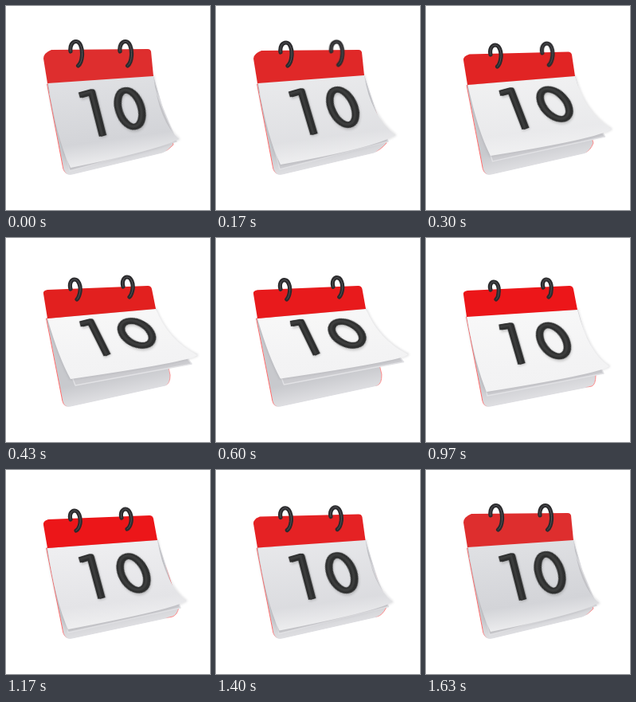
Write an HTML page without scripts that moves like this. It is 256 px wide and 256 px high and loops after 1710 ms.

```html
<!DOCTYPE html>
<html lang="en">
<head>
<meta charset="utf-8">
<title>Calendar</title>
<style>
html, body { margin: 0; width: 100%; height: 100%; overflow: hidden; background: #fff; }
svg { display: block; width: 100vw; height: 100vh; }
svg * { animation: 1710ms linear infinite; }
path, ellipse { stroke-linecap: round; stroke-linejoin: round; }

.stack { animation-name: stack; }
.sheet { animation-name: sheet; }
.page { animation-name: page; }
.head { animation-name: head; }
.one { animation-name: one; stroke-linecap: butt; }
.zero { animation-name: zero; }
.ring { animation-name: ring; }
.second { animation-name: second; }
.lit { animation-name: lit; }
.low { animation-name: low; }
.red { animation-name: red; }

.digits { fill: none; }
.shade { stroke: #555; stroke-width: 9; opacity: .3; }
.body { stroke: #2e2f2f; stroke-width: 7.2; }
.shine { stroke: #3c3d3d; stroke-width: 3; }
.tube { fill: none; stroke: #2b2b2d; stroke-width: 5.2; }
.gleam { fill: none; stroke: #55555a; stroke-width: 1; }

@keyframes stack {
  0%, 95.32%, to { d: path("M52 98L185 89L210 174Q203 182 196 184L83 211Q75 213 72 205Z"); }
  9.94% { d: path("M52 98L186 88L214 172Q206 181 198 184L83 211Q75 213 72 205Z"); }
  25.15%, 32.75% { d: path("M51 101L188 89L206 172Q206 183 200 185L81 211Q73 213 71 205Z"); }
  42.69% { d: path("M51 101L188 89L214 168Q215 183 210 185L81 211Q73 213 71 205Z"); }
  56.73% { d: path("M51 99L190 90L213 172Q213 184 208 186L81 211Q73 213 71 205Z"); }
  68.42% { d: path("M51 98L190 88L217 172Q215 182 209 184L83 211Q75 213 72 205Z"); }
}
@keyframes sheet {
  0%, 95.32%, to { d: path("M55 110L186 102L214 170L80 207Z"); }
  9.94% { d: path("M55 110L186 102L216 170L80 205Z"); }
  25.15% { d: path("M60 115L190 102L233 158L87 185Z"); }
  32.75% { d: path("M60 115L190 102L236 155L87 183Z"); }
  42.69% { d: path("M58 115L190 102L234 157L80 187Z"); }
  56.73% { d: path("M56 110L190 102L223 170L77 198Z"); }
  68.42% { d: path("M56 110L190 102L219 173L78 204Z"); }
}
@keyframes page {
  0%, 95.32%, to { d: path("M53 97L185 88Q192 145 217 167Q190 181 81 203Q63 165 53 97Z"); }
  9.94% { d: path("M53 97L186 87Q194 138 225 162Q200 178 81 199Q64 165 53 97Z"); }
  25.15% { d: path("M52 101L188 89Q203 128 240 147Q232 155 81 177Q66 150 52 101Z"); animation-timing-function: ease-out; }
  32.75% { d: path("M52 101L188 89Q204 127 242 145Q234 153 82 175Q67 150 52 101Z"); }
  42.69% { d: path("M52 101L188 89Q204 130 238 150Q228 158 77 181Q64 150 52 101Z"); }
  56.73% { d: path("M51 98L190 90Q204 145 230 161Q215 171 76 193Q62 160 51 98Z"); }
  68.42% { d: path("M52 98L190 88Q200 145 226 164Q215 174 78 200Q62 165 52 98Z"); }
}
@keyframes head {
  0%, 95.32%, to { d: path("M57 55L178 54Q181 54 182 57L185 88L52 97L47 66Q47 59 57 55Z"); }
  9.94% { d: path("M57 56L179 55Q182 55 183 58L186 87L52 97L47 66Q47 60 57 56Z"); }
  25.15%, 32.75% { d: path("M52 65L178 60Q182 60 183 64L188 89L52 101L47 70Q46 66 52 65Z"); }
  42.69% { d: path("M52 66L180 60Q184 60 185 64L188 89L52 101L47 71Q46 67 52 66Z"); }
  56.73% { d: path("M52 66L180 60Q184 60 185 64L190 90L51 99L47 71Q46 67 52 66Z"); }
  68.42% { d: path("M53 62L180 57Q184 57 185 61L190 88L52 98L47 69Q46 64 53 62Z"); }
}
@keyframes one {
  0%, 95.32%, to { d: path("M93 112L107.5 108L121.5 163"); }
  9.94% { d: path("M93 111L107 107L123 161"); }
  25.15% { d: path("M94 108L106 105L127 147"); }
  32.75% { d: path("M95 107L107 105L128 145"); }
  42.69% { d: path("M93 109L105 107L121 150"); }
  56.73% { d: path("M93 112L106 110L120 158"); }
  68.42% { d: path("M93 113L106 109L120 161"); }
}
@keyframes zero {
  0%, 95.32%, to { transform: translate(155.5px, 128.7px) rotate(71deg); rx: 23.8px; ry: 14px; }
  9.94% { transform: translate(159px, 127px) rotate(64deg); rx: 23.8px; ry: 13.8px; }
  25.15% { transform: translate(164px, 119.5px) rotate(29deg); rx: 21px; ry: 13.3px; }
  32.75% { transform: translate(165px, 119px) rotate(26deg); rx: 21px; ry: 12.8px; }
  42.69% { transform: translate(163px, 122.5px) rotate(35deg); rx: 20px; ry: 13px; }
  56.73% { transform: translate(160px, 129px) rotate(53deg); rx: 22px; ry: 14.2px; }
  68.42% { transform: translate(160px, 129.5px) rotate(61deg); rx: 23px; ry: 14.4px; }
}
@keyframes ring {
  0%, 95.32%, to { d: path("M81 57C80 50 83 44.5 88 44.5C93 44.5 96 53 95.5 62C95 69 93 73 90.5 75"); }
  9.94% { d: path("M81 58C80 51 83 46 88 46C93 46 95.5 54 95 62C94.5 69 92.5 73 90 75"); }
  25.15%, 32.75% { d: path("M81 64C79 57 82 52 86 52C91 52 94 60 93 67C92 73 90 76 89 77"); }
  42.69%, 56.73% { d: path("M81 65C79 59 82 55 85 55C90 55 92 62 91 69C91 74 89 76 88 77"); }
  68.42% { d: path("M81 62C79 56 82 51 86 51C91 51 94 59 93 67C92 72 90 75 88 76"); }
}
@keyframes second {
  0%, 95.32%, to { transform: translate(62px, 0); }
  25.15%, 56.73% { transform: translate(66px, -3px); }
  68.42% { transform: translate(64px, -2px); }
}
@keyframes lit {
  0%, 95.32%, to { stop-color: #e0e1e4; }
  25.15%, 56.73% { stop-color: #f8f8f8; }
  68.42% { stop-color: #efeff1; }
}
@keyframes low {
  0%, 95.32%, to { stop-color: #d3d4d8; }
  25.15%, 56.73% { stop-color: #f3f3f4; }
  68.42% { stop-color: #e4e4e7; }
}
@keyframes red {
  0%, 95.32%, to { fill: #de2e2e; }
  25.15% { fill: #e2201f; }
  42.69%, 68.42% { fill: #ec1619; }
}
</style>
</head>
<body>
<svg viewBox="0 0 256 256">
  <defs>
    <linearGradient id="paper" x1=".3" y1="0" x2=".5" y2="1">
      <stop class="lit" offset="0"/>
      <stop class="low" offset=".7"/>
      <stop offset="1" stop-color="#f2f2f3"/>
    </linearGradient>
    <linearGradient id="side" gradientUnits="userSpaceOnUse" x1="130" y1="175" x2="136" y2="204">
      <stop offset="0" stop-color="#c8c9cd"/>
      <stop offset="1" stop-color="#e2e2e5"/>
    </linearGradient>
    <linearGradient id="fringe" gradientUnits="userSpaceOnUse" x1="50" y1="0" x2="220" y2="0">
      <stop offset=".12" stop-color="#ff6a6a"/>
      <stop offset=".16" stop-color="#dcdce0"/>
      <stop offset=".88" stop-color="#dcdce0"/>
      <stop offset=".92" stop-color="#ff8a8a"/>
    </linearGradient>
    <filter id="soft"><feGaussianBlur stdDeviation="1.5"/></filter>
  </defs>

  <path class="stack" fill="url(#side)" stroke="url(#fringe)"/>
  <path class="sheet" fill="#ccccd0" stroke="#e2e2e5" stroke-width="1.4"/>
  <path class="page" fill="none" stroke="#8c8c92" stroke-width="2" opacity=".35" filter="url(#soft)"/>
  <path class="page" fill="url(#paper)"/>
  <g class="red"><path class="head"/></g>

  <!-- Two offset copies make the upright strokes heavier. -->
  <g class="digits">
    <g class="shade" transform="translate(1 1.5)" filter="url(#soft)">
      <path class="one"/><ellipse class="zero"/>
    </g>
    <g class="body" transform="translate(-1.2 0)"><path class="one"/><ellipse class="zero"/></g>
    <g class="body" transform="translate(1.2 0)"><path class="one"/><ellipse class="zero"/></g>
    <g class="shine" transform="translate(-.8 -.6)"><path class="one"/><ellipse class="zero"/></g>
  </g>

  <path class="ring tube"/>
  <path class="ring gleam"/>
  <g class="second">
    <path class="ring tube"/>
    <path class="ring gleam"/>
  </g>
</svg>
</body>
</html>
```
